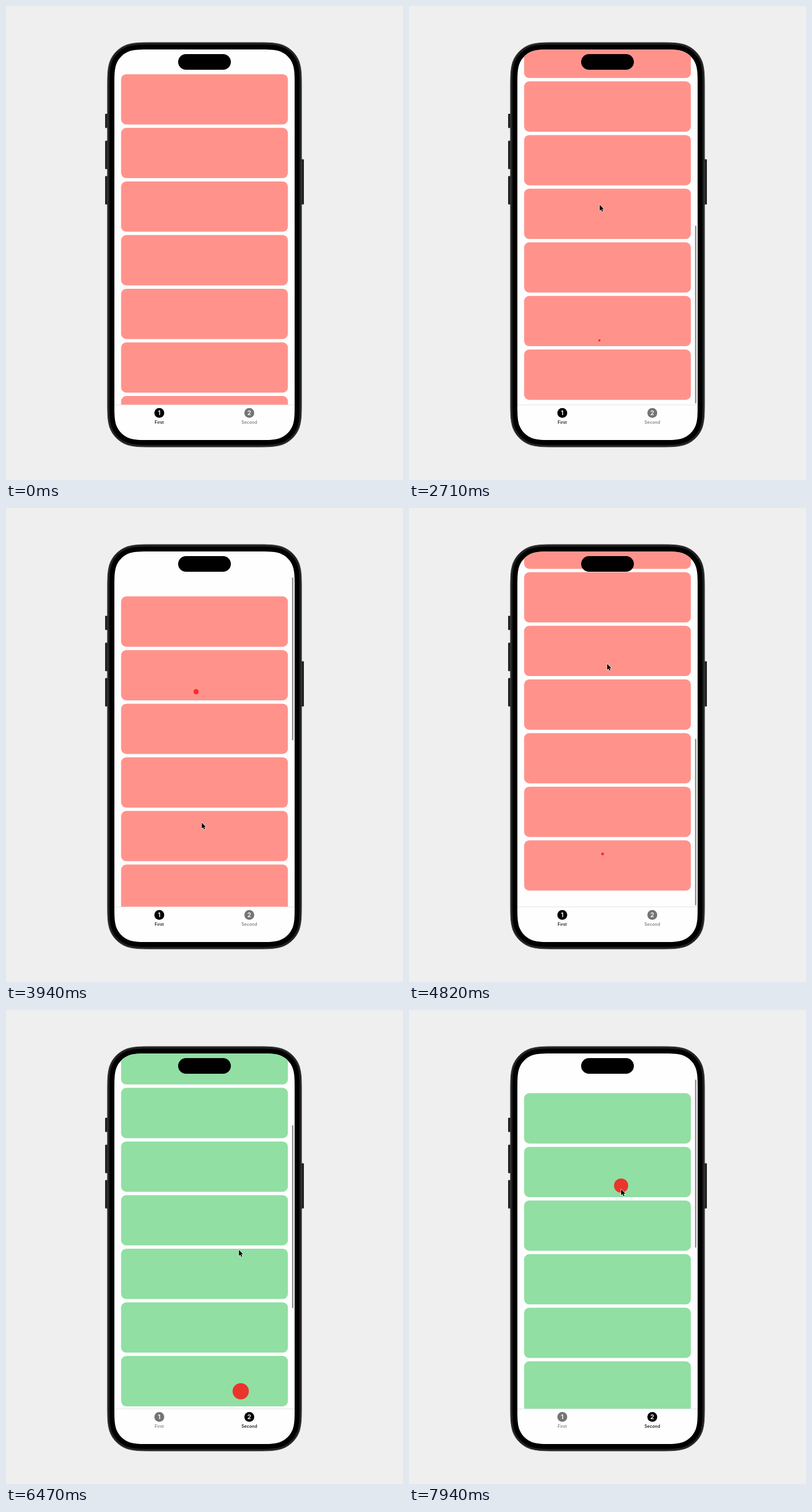
These frames come from a looping animation (685 by 818 pixels, 8 s). An HTML page:

```html
<!DOCTYPE html>
<html lang="en">
<head>
<meta charset="utf-8">
<title>Tab scrolling</title>
<style>
  html, body { margin: 0; width: 100%; height: 100%; overflow: hidden; background: #efefef; }
  svg { display: block; width: 100%; height: 100%; }
  text { font-family: Inter, "Liberation Sans", sans-serif; text-anchor: middle; }
  .tab { fill: #747474; }
  .tab.on { fill: #000; }
  .tab .num { font-size: 11px; font-weight: 600; fill: #fff; }
  .tab .label { font-size: 7.3px; font-weight: 500; letter-spacing: .1px; }
</style>
</head>
<body>
<svg viewBox="0 0 685 818">
  <defs>
    <clipPath id="screen"><path id="mask"/></clipPath>
    <clipPath id="list"><rect x="187" y="75" width="311" height="613"/></clipPath>
  </defs>

  <g fill="#1f1f20">
    <rect x="171" y="186" width="5" height="24.5" rx="1"/>
    <rect x="171" y="232.5" width="5" height="49" rx="1"/>
    <rect x="171" y="293.5" width="5" height="49" rx="1"/>
    <rect x="509" y="264.5" width="5" height="78" rx="1"/>
  </g>
  <path id="body" fill="#222223" stroke="#454547"/>
  <path id="bezel"/>
  <path id="glass" fill="#fefefe"/>

  <g clip-path="url(#screen)">
    <g clip-path="url(#list)"><g id="cards"></g></g>
    <rect id="bar" x="493.6" width="2.3" rx="1.15" fill-opacity=".46"/>
    <rect x="187" y="687.9" width="311" height=".7" fill="#d9d9d9"/>
    <g class="tab" id="tab1">
      <circle cx="264.5" cy="702.3" r="8.5"/>
      <text class="num" x="264.3" y="706.3">1</text>
      <text class="label" x="264.5" y="721">First</text>
    </g>
    <g class="tab" id="tab2">
      <circle cx="419.8" cy="702.3" r="8.5"/>
      <text class="num" x="419.8" y="706.3">2</text>
      <text class="label" x="419.8" y="721">Second</text>
    </g>
  </g>
  <rect x="297" y="83" width="91" height="27" rx="13.5"/>

  <g id="dots"></g>
  <path id="cursor" d="M0 0V10.4L2.4 8.2L4 11.9L5.7 11.2L4.1 7.5H7.4Z"
        stroke="#fff" stroke-width="1.2" stroke-linejoin="round" paint-order="stroke"/>
</svg>
<script>
const LOOP = 8000, SWITCH = 5780;
const COUNT = 12, PITCH = 92.55, TOP = 117.7, END = 534;
const DRAG = 240, FLING = 370, PULL = 70, SPRING = 110;
const $ = id => document.getElementById(id);
const clamp = (v, lo = 0, hi = 1) => Math.min(hi, Math.max(lo, v));
const smooth = u => u * u * (3 - 2 * u);

function set(el, attrs) {
  for (const k in attrs) el.setAttribute(k, attrs[k]);
}
function add(parent, tag, attrs) {
  const el = document.createElementNS('http://www.w3.org/2000/svg', tag);
  set(el, attrs);
  return parent.appendChild(el);
}

// Rectangle with continuous-curvature corners.
function squircle(x, y, w, h, r) {
  const half = [[1.529, 0], [1.088, 0], [.868, 0], [.632, .075], [.373, .169]];
  const corner = [...half, ...half.map(([a, b]) => [b, a]).reverse()];
  const place = (right, low) => {
    const pts = corner.map(([a, b]) =>
      [right ? x + w - a * r : x + a * r, low ? y + h - b * r : y + b * r]);
    if (right !== low) pts.reverse();
    return `${pts[0]}C${pts.slice(1)}`;
  };
  return `M${place(false, false)}L${place(false, true)}L${place(true, true)}L${place(true, false)}Z`;
}

// dir: 1 scrolls down, -1 up, 0 is a tap; far: flings the whole list; bounce: pixels past the edge.
const swipe = (t, x, y, toX, toY, dir, far, bounce) => ({ t, x, y, toX, toY, dir, far, bounce });
const swipes = [
  swipe(1519, 320.5, 629.5, 323, 506, 1, true, 53),
  swipe(2266, 328.5, 577, 329, 343, 1, false, 27),
  swipe(3070, 329, 337, 335, 540, -1, true, 40),
  swipe(3553, 328, 317, 339, 522, -1, false, 68),
  swipe(4387, 334, 597, 330, 195, 1, true, 32),
  swipe(5710, 413, 703, 413, 709, 0, false, 0),
  swipe(6304, 405, 658, 401, 343, 1, true, 40),
  swipe(7306, 372, 303, 375, 530, -1, true, 44),
  swipe(7871, 366, 303, 366, 311, -1, false, 60)
];

// The cursor comes in, then hops to each press early, waits and drags.
const stops = [[290, 355, 806], [760, 313, 613]];
for (const { t, x, y, toX, toY } of swipes) {
  const last = stops[stops.length - 1][0];
  stops.push([last + .75 * (t - last), x, y + 6], [t, x, y + 6], [t + DRAG, toX, toY]);
}
function cursorAt(t) {
  const i = Math.max(1, stops.findIndex(s => s[0] > t));
  const [t0, x0, y0] = stops[i - 1], [t1, x1, y1] = stops[i];
  const u = smooth(clamp((t - t0) / (t1 - t0)));
  return [x0 + (x1 - x0) * u, y0 + (y1 - y0) * u];
}

const settle = u => u > 0 ? u * Math.exp(1 - u) : 0;
function travel(s, t) {
  const dt = t - s.t, u = clamp(dt / FLING);
  const run = s.far ? END * u * u * (2 - u) : 0;
  return s.dir * (run + s.bounce * settle((dt - (s.far ? FLING : PULL)) / SPRING));
}
const radius = dt => 14 * clamp(Math.min(dt / 80, 1 - (dt - 170) / 320));

const frame = { body: [175, 63, 335, 698, 53], bezel: [178.5, 66.5, 328, 691, 49.5],
  glass: [187, 75, 311, 674, 41], mask: [187, 75, 311, 674, 41] };
for (const id in frame) set($(id), { d: squircle(...frame[id]) });
for (let i = 0; i < COUNT; i++)
  add($('cards'), 'rect', { x: 198.6, y: TOP + i * PITCH, width: 287.8, height: 86.8, rx: 9 });
const dots = swipes.map(s => add($('dots'), 'circle', { cx: s.x, cy: s.y }));

function draw(t) {
  const second = t >= SWITCH;
  const live = swipes.filter(s => s.dir && s.t <= t && (s.t >= SWITCH) === second);
  const scroll = live.reduce((sum, s) => sum + travel(s, t), 0);
  const inside = clamp(scroll, 0, END);
  const over = Math.abs(scroll - inside);
  const idle = live.length ? t - live[live.length - 1].t : LOOP;

  set($('cards'), { transform: `translate(0 ${-scroll})`, fill: second ? '#91dfa3' : '#ff938c' });
  set($('bar'), {
    y: 120 + 250 * inside / END + (scroll > END ? over : 0),
    height: 316 - over,
    opacity: clamp((1200 - idle) / 250)
  });
  $('tab1').classList.toggle('on', !second);
  $('tab2').classList.toggle('on', second);
  set($('dots'), { fill: second ? '#ea352c' : '#fa2b29' });
  dots.forEach((dot, i) => set(dot, { r: radius(t - swipes[i].t) }));
  set($('cursor'), {
    transform: `translate(${cursorAt(t)})`,
    visibility: t < stops[0][0] ? 'hidden' : 'visible'
  });
}

const start = performance.now();
function tick(now) {
  draw(Math.max(0, now - start) % LOOP);
  requestAnimationFrame(tick);
}
draw(0);
requestAnimationFrame(tick);
</script>
</body>
</html>
```
